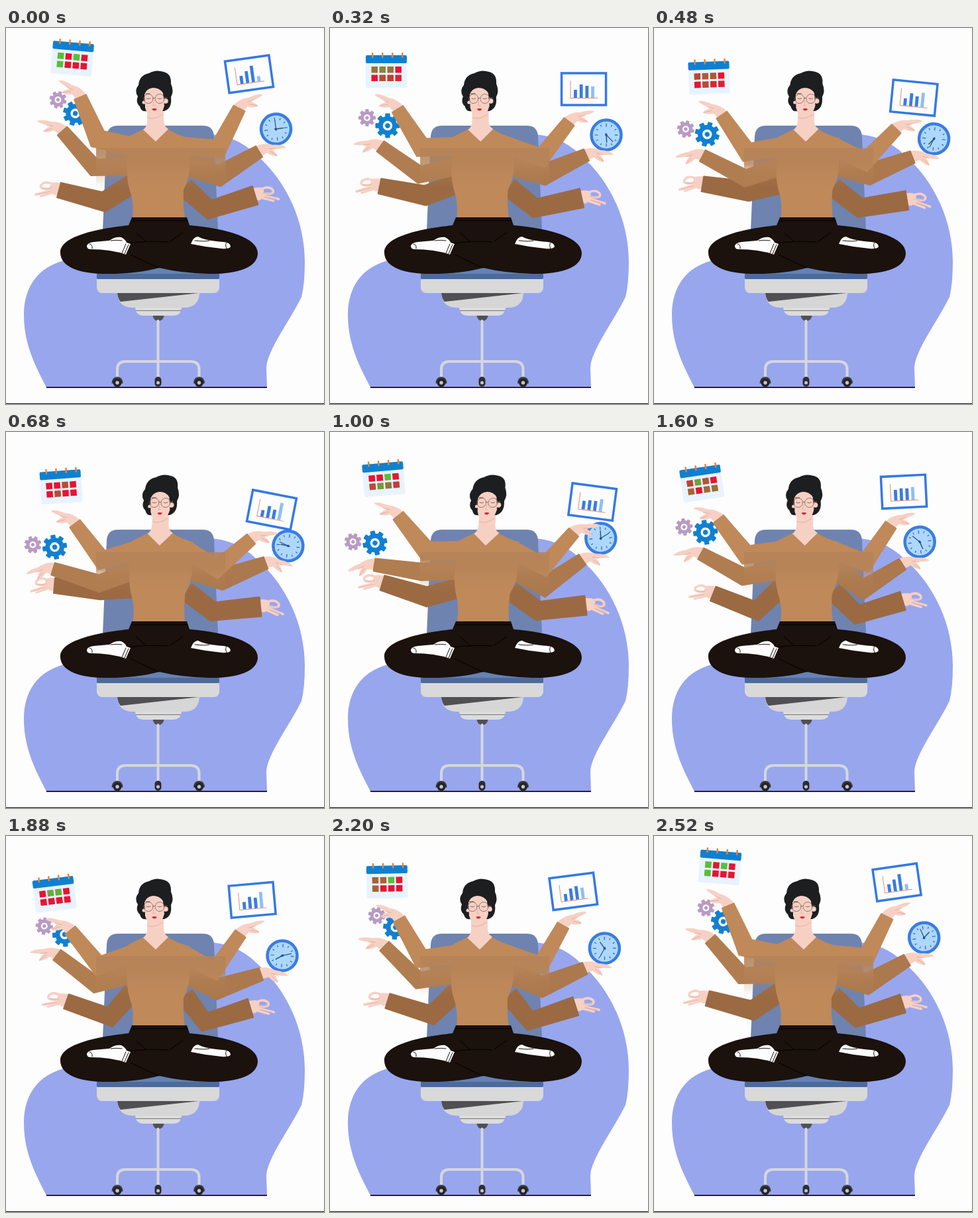
An HTML page with a canvas that plays this animation: 480 px wide and 566 px high, repeating every 2.56 s.

```html
<!DOCTYPE html>
<html lang="en">
<head>
<meta charset="utf-8">
<title>Multitasking meditation</title>
<style>
html, body { margin: 0; height: 100%; overflow: hidden; background: #fdfdfd; }
canvas { display: block; }
</style>
</head>
<body>
<canvas id="stage" width="480" height="566"></canvas>
<script>
const ctx = document.getElementById('stage').getContext('2d');
const LOOP = 2560, TAU = Math.PI * 2, RAD = Math.PI / 180;
const SKIN = '#f7d0c4', SKIN_LINE = '#e3a698', SHIRT = '#bf895a', BLACK = '#1b110d', BLUE = '#3579e6';

// Pose times; every track below holds one value (or row) per pose.
const TIMES = [0, 320, 680, 1000, 1320, 1880];
const SWAY = [[0], [.13], [.65], [1], [.48], [0]];
const BARS = [[12, 18, 25, 8], [12, 20, 18, 17], [10, 18, 14, 26], [13, 15, 15, 19], [21, 18, 20, 13], [11, 18, 16, 24]];
const CELLS = ['09090999', '43499678', '99699699', '99096247', '44990900', '91199999'].map(s => [...s].map(Number));

// track rows: wrist x, wrist y, hand rotation in degrees
const ARMS = {
  lowLeft: { shoulder: [190, 235], bones: [70, 50], widths: [11.5, 15, 14], color: '#9b6a43', hand: pinch, turn: 0,
    track: [[80, 244, 2], [75, 238, 0], [73, 231, -1], [79, 227, 2], [85, 235, 4], [91, 249, 5]] },
  lowRight: { shoulder: [270, 240], bones: [72, 50], widths: [14.5, 14.5, 14], color: '#9b6a43', hand: pinch, turn: 0,
    track: [[376, 252, -4], [380, 256, 0], [384, 263, 5], [386, 261, 6], [384, 250, 0], [369, 259, -3]] },
  midLeft: { shoulder: [190, 208], bones: [73, 57], widths: [9.5, 13, 13], color: '#b07d50', hand: palm, turn: -28, prop: gears,
    track: [[85, 155, 17], [76, 178, 0], [71, 206, -15], [67, 200, -18], [65, 187, -15], [77, 179, 1]] },
  midRight: { shoulder: [270, 205], bones: [70, 55], widths: [9.5, 16, 15], color: '#ab794d', hand: palm, turn: -31, prop: clock,
    track: [[382, 186, -8], [387, 191, 0], [392, 197, 8], [381, 192, -4], [366, 187, -18], [385, 208, 4]] },
  topLeft: { shoulder: [190, 178], bones: [68, 53], widths: [9.5, 15, 13], color: SHIRT, hand: palm, turn: 0, prop: calendar,
    track: [[112, 104, 5], [102, 122, 0], [104, 138, -4], [103, 126, -5], [100, 116, -8], [97, 142, -7]] },
  topRight: { shoulder: [268, 178], bones: [68, 53], widths: [9.5, 15, 13], color: SHIRT, hand: palm, turn: -10, prop: chart,
    track: [[352, 121, -8], [361, 141, 0], [370, 161, 11], [368, 151, 7.5], [362, 132, .5], [354, 147, -5]] }
};

// Smooth periodic interpolation through the poses.
function sample(track, t) {
  const n = TIMES.length;
  const at = i => TIMES[(i + n) % n] + LOOP * Math.floor(i / n);
  const row = i => track[(i + n) % n];
  let i = n - 1;
  while (TIMES[i] > t) i--;
  const span = at(i + 1) - at(i), u = (t - at(i)) / span;
  return row(i).map((a, k) => {
    const b = row(i + 1)[k];
    const m0 = (b - row(i - 1)[k]) / (at(i + 1) - at(i - 1)) * span;
    const m1 = (row(i + 2)[k] - a) / (at(i + 2) - at(i)) * span;
    return a + u * (m0 + u * (3 * (b - a) - 2 * m0 - m1 + u * (2 * (a - b) + m0 + m1)));
  });
}

function shape(d, fill, stroke, width = 1) {
  const p = new Path2D(d);
  if (fill) { ctx.fillStyle = fill; ctx.fill(p); }
  if (stroke) { ctx.strokeStyle = stroke; ctx.lineWidth = width; ctx.stroke(p); }
}
function rect(x, y, w, h, fill, r = 0) {
  ctx.fillStyle = fill;
  ctx.beginPath(); ctx.roundRect(x, y, w, h, r); ctx.fill();
}
function disc(x, y, r, fill, stroke, width = 1) {
  ctx.beginPath(); ctx.arc(x, y, r, 0, TAU);
  if (fill) { ctx.fillStyle = fill; ctx.fill(); }
  if (stroke) { ctx.strokeStyle = stroke; ctx.lineWidth = width; ctx.stroke(); }
}
function placed(x, y, degrees, draw) {
  ctx.save();
  ctx.translate(x, y); ctx.rotate(degrees * RAD);
  draw();
  ctx.restore();
}

function palm() {
  shape('M9 -4 Q0 -15 -14 -17 Q-28 -24 -35 -22 Q-33 -19 -21 -13 L-17 -11 Q-28 -7 -28 -4 Q-20 -1 -12 -3 L-4 7 Z', SKIN);
  shape('M-21 -13 L-12 -10 M-27 -5 L-15 -7', null, SKIN_LINE, .8);
}
function pinch() {
  shape('M5 -10 Q-6 -13 -13 -10 L-15 3 L-6 8 L5 6 Z', SKIN);
  shape('M-12 1 L-35 8 M-9 4 L-27 10', null, SKIN, 3.5);
  shape('M-10 -8 Q-20 -14 -27 -7 Q-30 -1 -20 -1 L-10 -2', null, SKIN, 3.5);
  shape('M-14 3 L-32 8 M-12 -3 Q-18 0 -25 -2', null, SKIN_LINE, .8);
}

function gear(x, y, r, color, angle) {
  placed(x, y, angle, () => {
    for (let i = 0; i < 8; i++) {
      ctx.rotate(TAU / 8);
      rect(-r * .2, -r, r * .4, r * .5, color, 1);
    }
    disc(0, 0, r * .58, null, color, r * .38);
    disc(0, 0, r * .2, color);
  });
}
function gears(t) {
  const angle = t / LOOP * 360;
  gear(11, -31, 18.5, '#1180d2', angle);
  gear(-20, -43, 13, '#b99ac4', -angle);
}
function calendar(t) {
  placed(-17, -57, 0, () => {
    rect(-31, -24, 62, 49, '#e9f3fd', 3);
    rect(-31, -24, 62, 12, '#0f80d0', 2);
    sample(CELLS, t).forEach((v, i) => {
      const m = Math.min(1, Math.max(0, v / 9));
      rect(-22.5 + i % 4 * 12, -7 + (i >> 2) * 12.5, 9.5, 9.5,
        `rgb(${90 + 140 * m},${190 - 170 * m},${60 - 10 * m})`);
    });
    for (let i = 0; i < 4; i++) rect(-22 + i * 15, -28, 2.5, 8, '#e9823c', 1);
  });
}
function chart(t) {
  placed(22, -49, 0, () => {
    ctx.lineJoin = 'miter';
    shape('M-33.5 -24 H33.5 V24 H-33.5 Z', '#fdfdfd', BLUE, 3.5);
    sample(BARS, t).forEach((h, i) => rect(-15 + i * 8.7, 13 - h, 4.8, h, i < 3 ? '#397be2' : '#8fbef8'));
    shape('M-20 -12 V13.5 H21', null, '#df8c78', 1);
    ctx.lineJoin = 'round';
  });
}
function clock(t) {
  placed(30, -30, 0, () => {
    disc(0, 0, 22.5, '#aed7fd', '#397de3', 4.5);
    for (let i = 0; i < 12; i++) {
      ctx.rotate(TAU / 12);
      shape(i % 3 == 2 ? 'M0 -17 V-13' : 'M0 -17 V-15', null, '#2d659f', 1.2);
    }
  });
  placed(30, -30, t / LOOP * 1080, () => shape('M0 2 V-14', null, '#245480', 1.2));
  placed(30, -30, 90 + t * .27, () => shape('M0 2 V-11', null, '#245480', 1.5));
  disc(30, -30, 1.8, '#245480');
}

// Two-bone arm: the elbow always hangs below the shoulder-wrist line.
function arm({ shoulder, bones: [fore, upper], widths, color, hand, turn, prop, track }, t, lean) {
  const [x, y, angle] = sample(track, t);
  const sx = shoulder[0] + lean * (290 - shoulder[1]), sy = shoulder[1];
  const dist = Math.hypot(sx - x, sy - y), dx = (sx - x) / dist, dy = (sy - y) / dist;
  const along = (fore * fore - upper * upper + dist * dist) / (2 * dist);
  const drop = Math.sqrt(Math.max(0, fore * fore - along * along)) * Math.sign(dx);
  const ex = x + dx * along - dy * drop, ey = y + dy * along + dx * drop;

  placed(x, y, angle, () => {
    if (prop) prop(t);
    if (dx < 0) ctx.scale(-1, 1);
    ctx.rotate(turn * RAD);
    hand();
  });

  const a1 = Math.atan2(ey - y, ex - x), a2 = Math.atan2(sy - ey, sx - ex);
  const bend = Math.atan2(Math.sin(a2 - a1), Math.cos(a2 - a1));
  const joints = [[x, y, a1], [ex, ey, a1 + bend / 2], [sx, sy, a2]];
  const edge = side => joints.map(([px, py, a], i) =>
    [px + side * Math.sin(a) * widths[i], py - side * Math.cos(a) * widths[i]]);
  const outline = 'M' + [...edge(1), ...edge(-1).reverse()].join('L') + 'Z';
  shape(outline, color, color, 2);
}

function backdrop() {
  rect(0, 0, 480, 566, '#fdfdfd');
  shape('M61 541 C48 515 27 480 27 432 C27 390 48 360 88 350 L160 300 L300 160 Q345 159 378 191 C425 232 451 292 451 352 Q451 385 446 405 C430 438 393 487 393 512 L394 541 Z', '#98a6ee');
  rect(0, 565, 480, 1, '#111');
  rect(61, 540, 333, 2, '#2d1b45');
}
function chair() {
  shape('M146 305 L152 163 Q153 147 169 147 H297 Q313 147 314 163 L320 305 Z', '#6e83b0');
  rect(137, 352, 185, 26, '#6482b4', 3);
  rect(137, 370, 185, 8, '#4c6b9b', 2);
  rect(137, 378, 185, 21, '#d9d9d9', [0, 0, 8, 8]);
  shape('M168 399 H292 Q291 421 268 421 H190 Q169 420 168 399 Z', '#d6d6d6');
  shape('M168 399 H291 L173 412 Q169 408 168 399 Z', '#505053');
  shape('M195 421 H265 Q264 433 252 433 H208 Q196 433 195 421 Z', '#dcdcdc');
  shape('M196 425.5 H264', null, '#77777a', 1);
  shape('M221.5 433 H238.5 Q237 441 230 441 Q223 441 221.5 433 Z', '#505053');
  shape('M229.5 441 V528 M168 528 V514 Q168 502 180 502 H279 Q291.5 502 291.5 514 V528', null, '#d5d7db', 4);
  for (const x of [168, 291.5]) {
    shape(`M${x - 8.5} 535 Q${x - 8} 525 ${x} 525 Q${x + 8} 525 ${x + 8.5} 535 Z`, '#3b3b40');
    disc(x, 534, 6.5, '#242428');
    disc(x, 534, 2.7, '#c4c6c8');
  }
  rect(224.5, 525, 10, 15, '#2c2c31', 5);
  disc(229.5, 534, 2.5, '#c4c6c8');
}
function torso() {
  shape('M208 152 L226 171 L244 152 Q258 161 277 166 L277 205 Q278 224 268 244 Q267 265 270 288 H191 Q194 262 186 242 Q181 222 183 200 L184 164 Z', SHIRT);
  shape('M213 122 L238 118 L238 140 Q239 149 245 152 L226 171 L207 153 Q213 149 213 140 Z', SKIN);
}
function head() {
  shape('M214 125 Q204 127 202 118 Q195 112 199 103 Q193 94 200 86 Q201 71 216 68 Q226 62 238 66 Q250 69 249 84 Q254 95 249 104 Q251 121 239 125 Z', '#1d1e20');
  disc(241, 110, 3.8, SKIN);
  disc(208, 112, 2.5, SKIN);
  shape('M209 100 Q212 91 222 90 Q232 90 237 98 L239 117 Q236 131 225 135 Q213 133 210 120 Z', SKIN);
  shape('M214 135 Q224 139 236 130', null, SKIN_LINE, .8);
  shape('M211 99 L217 99', null, '#3a2a28', 1.2);
  shape('M212 106 Q215 108 218 106 M229 106 Q232 108 235 106', null, '#6a4d46', .8);
  disc(215, 106.5, 7, null, '#8a6c62', .9);
  disc(232, 106.5, 7, null, '#8a6c62', .9);
  shape('M222 105.5 H225 M239 105.5 L243 105', null, '#8a6c62', .9);
  shape('M223 110 L222 117 L225 117', null, SKIN_LINE, .8);
  shape('M220 122 Q224 120 228 122 Q224 127 220 122 Z', '#c2313a');
}
function softBand() {
  const g = ctx.createLinearGradient(0, 181, 0, 250);
  [[0, .9], [.36, .8], [.52, .3], [.85, 0]].forEach(([p, a]) => g.addColorStop(p, `rgba(181,131,88,${a})`));
  rect(136, 181, 195, 69, g);
}
function legs() {
  shape('M190 285 H273 L277 297 C335 302 380 316 380 339 C380 362 345 371 305 370 Q265 369 231 361 Q195 371 145 370 C105 369 82 357 82 338 C82 315 130 303 185 297 Z', BLACK);
  shape('M190 290 H274 M196 308 L211 321 M267 308 L248 321 M188 341 Q205 350 231 361 M184 324 Q215 320 245 322', null, '#000', 1);
  shape('M122 328 Q123 323 133 322 L156 320 Q164 314 174 315 Q180 318 182 323 L188 325 L181 341 Q158 333 126 333 Q122 332 122 328 Z', '#fdfdfd');
  shape('M181 325 L175 339 M185 326 L179 340 M126 325 Q131 326 130 332 M158 320 Q168 319 175 320', null, BLACK, 1);
  shape('M279 325 Q283 314 290 314 Q300 320 328 322 Q339 323 339 329 Q337 333 325 332 Q302 330 279 325 Z', '#fdfdfd');
  shape('M285 320 Q300 322 307 320 M333 323 Q330 326 333 332', null, BLACK, 1);
}

function frame(now) {
  const t = now % LOOP;
  const lean = Math.max(0, sample(SWAY, t)[0]) * .075;
  ctx.lineCap = ctx.lineJoin = 'round';
  backdrop();
  chair();
  for (const name of ['lowLeft', 'lowRight', 'midLeft', 'midRight']) arm(ARMS[name], t, lean);
  ctx.save();
  ctx.transform(1, 0, -lean, 1, 290 * lean, 0);
  torso();
  head();
  ctx.restore();
  arm(ARMS.topLeft, t, lean);
  arm(ARMS.topRight, t, lean);
  softBand();
  legs();
  requestAnimationFrame(() => frame(performance.now()));
}
frame(performance.now());
</script>
</body>
</html>
```
